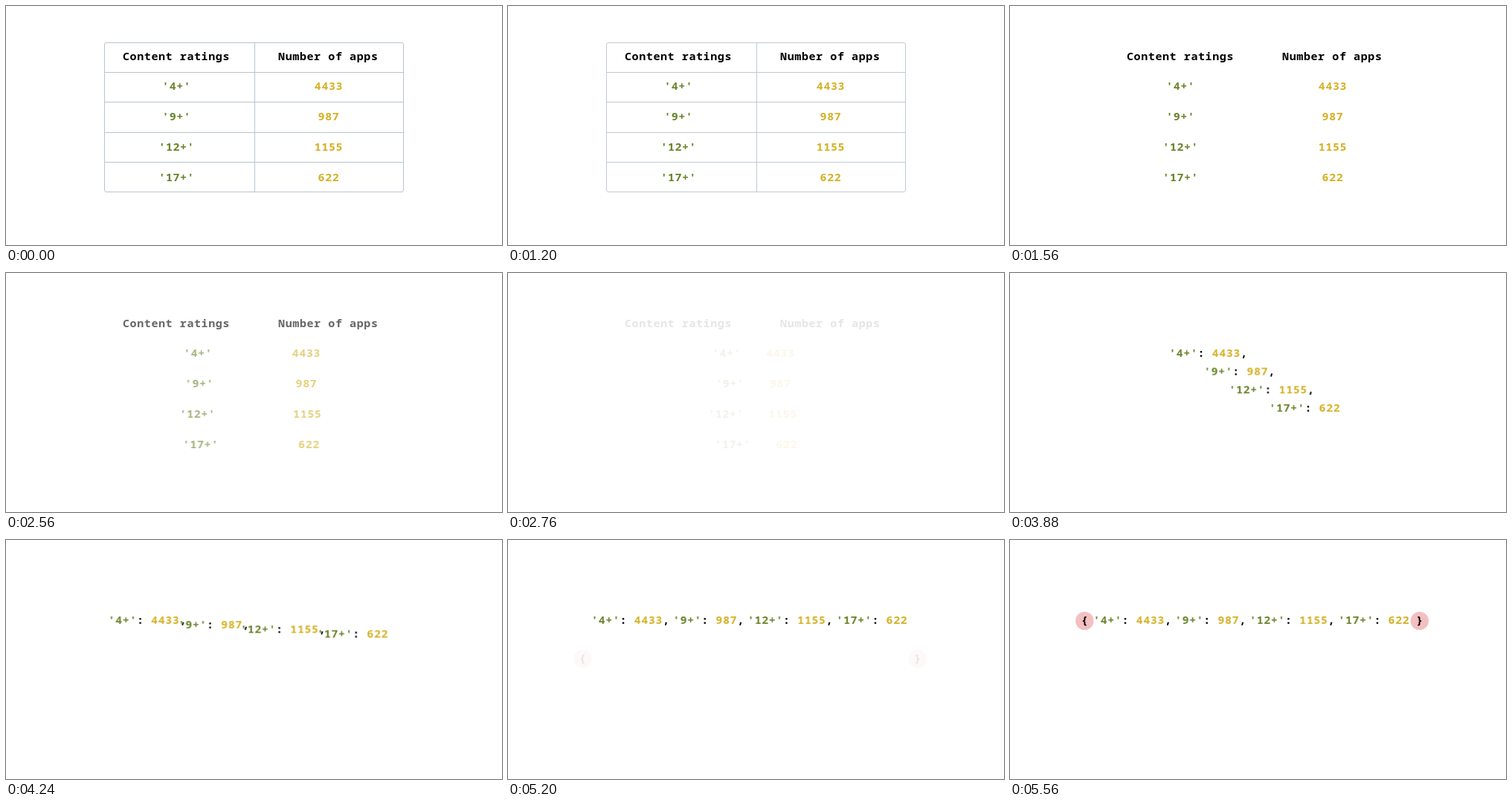
Write an HTML page that moves like this. It is 667x322 px and loops after 9600 ms.

```html
<!DOCTYPE html>
<html lang="en">
<head>
<meta charset="utf-8">
<title>Table to dictionary</title>
<style>
  html, body { margin: 0; width: 100%; height: 100%; overflow: hidden; background: #fff; }
  svg { display: block; width: 100%; height: 100%; }
  text { font: 700 15px "Noto Sans Mono", "DejaVu Sans Mono", monospace; letter-spacing: .04em; }
  .key { fill: #69832a; }
  .num { fill: #d4b126; }
  .table { fill: none; stroke: #b8c4d0; }
  .brace circle { fill: #f3bfc0; }

  .table, .title, .cell, .mark, .row, .brace {
    animation: 9600ms linear -1ms infinite;
  }
  .table { animation-name: hide-table; }
  .title { animation-name: hide-title; }
  .cell  { animation-name: gather; }
  .mark  { animation-name: show-mark; }
  .row   { animation-name: line-up; }
  .brace { animation-name: rise; }

  @keyframes hide-table {
    0% { opacity: 1; }
    12.0833% { opacity: 1; animation-timing-function: steps(10); }
    16.25%, 100% { opacity: 0; }
  }
  @keyframes hide-title {
    0% { opacity: 1; }
    25% { opacity: 1; animation-timing-function: steps(10); }
    29.1667%, 100% { opacity: 0; }
  }
  @keyframes gather {
    0% { opacity: 1; transform: translateX(var(--from)); }
    25% { opacity: 1; transform: translateX(var(--from)); animation-timing-function: steps(10); }
    29.166% { opacity: 0; }
    29.1667%, 100% { opacity: 1; transform: translateX(0); }
  }
  @keyframes show-mark {
    0% { opacity: 0; animation-timing-function: step-end; }
    29.1667%, 100% { opacity: 1; }
  }
  @keyframes line-up {
    0% { transform: translate(var(--dx), var(--dy)); }
    37.0833% { transform: translate(var(--dx), var(--dy)); animation-timing-function: steps(20); }
    45.4167%, 100% { transform: translate(0, 0); }
  }
  @keyframes rise {
    0% { opacity: 0; transform: translateY(57px); }
    53.75% { opacity: 0; transform: translateY(57px); animation-timing-function: steps(10); }
    57.9167%, 100% { opacity: 1; transform: translateY(0); }
  }
</style>
</head>
<body>
<svg id="stage" viewBox="0 0 667 322">
  <g class="table">
    <rect x="132.5" y="49.5" width="402" height="201" rx="2.5"/>
    <path d="M334.5 49.5V250.5M132.5 89.5H534.5M132.5 129.5H534.5M132.5 170.5H534.5M132.5 210.5H534.5"/>
  </g>
</svg>
<script>
  const CHAR = 9.6, BASELINE = 113.4, ROW_STEP = 41, GAP = 4.2;
  const KEY_CENTER = 229, NUM_CENTER = 433.7;
  const stage = document.getElementById('stage');

  function add(parent, tag, attrs, content = '') {
    const el = document.createElementNS('http://www.w3.org/2000/svg', tag);
    for (const name in attrs) el.setAttribute(name, attrs[name]);
    el.textContent = content;
    return parent.appendChild(el);
  }

  // Half of the letter spacing keeps each glyph centred in its cell.
  function write(parent, cls, x, y, content) {
    return add(parent, 'text', { class: cls, x: x + 0.3, y }, content);
  }

  write(stage, 'title', 156.7, 73.4, 'Content ratings');
  write(stage, 'title', 365.8, 73.4, 'Number of apps');

  let x = 111.7;
  [["'4+'", '4433', 170], ["'9+'", '987', 65], ["'12+'", '1155', -46], ["'17+'", '622', -155]]
    .forEach(([key, num, dx], i, rows) => {
      const row = add(stage, 'g', { class: 'row', style: `--dx:${dx}px;--dy:${i * ROW_STEP}px` });
      const cell = (cls, left, center, content) => {
        const from = center - content.length * CHAR / 2 - left - dx;
        write(row, 'cell ' + cls, left, BASELINE, content).style.setProperty('--from', from + 'px');
      };
      const colonX = x + key.length * CHAR;
      const numX = colonX + 2 * CHAR;
      const commaX = numX + num.length * CHAR;
      cell('key', x, KEY_CENTER, key);
      cell('num', numX, NUM_CENTER, num);
      write(row, 'mark', colonX, BASELINE, ':');
      if (i < rows.length - 1) write(row, 'mark', commaX, BASELINE, ',');
      x = commaX + CHAR + GAP;
    });

  [['{', 100.3], ['}', 550.8]].forEach(([brace, cx]) => {
    const g = add(stage, 'g', { class: 'brace' });
    add(g, 'circle', { cx, cy: 109, r: 12.2 });
    write(g, '', cx - CHAR / 2, BASELINE, brace);
  });
</script>
</body>
</html>
```
